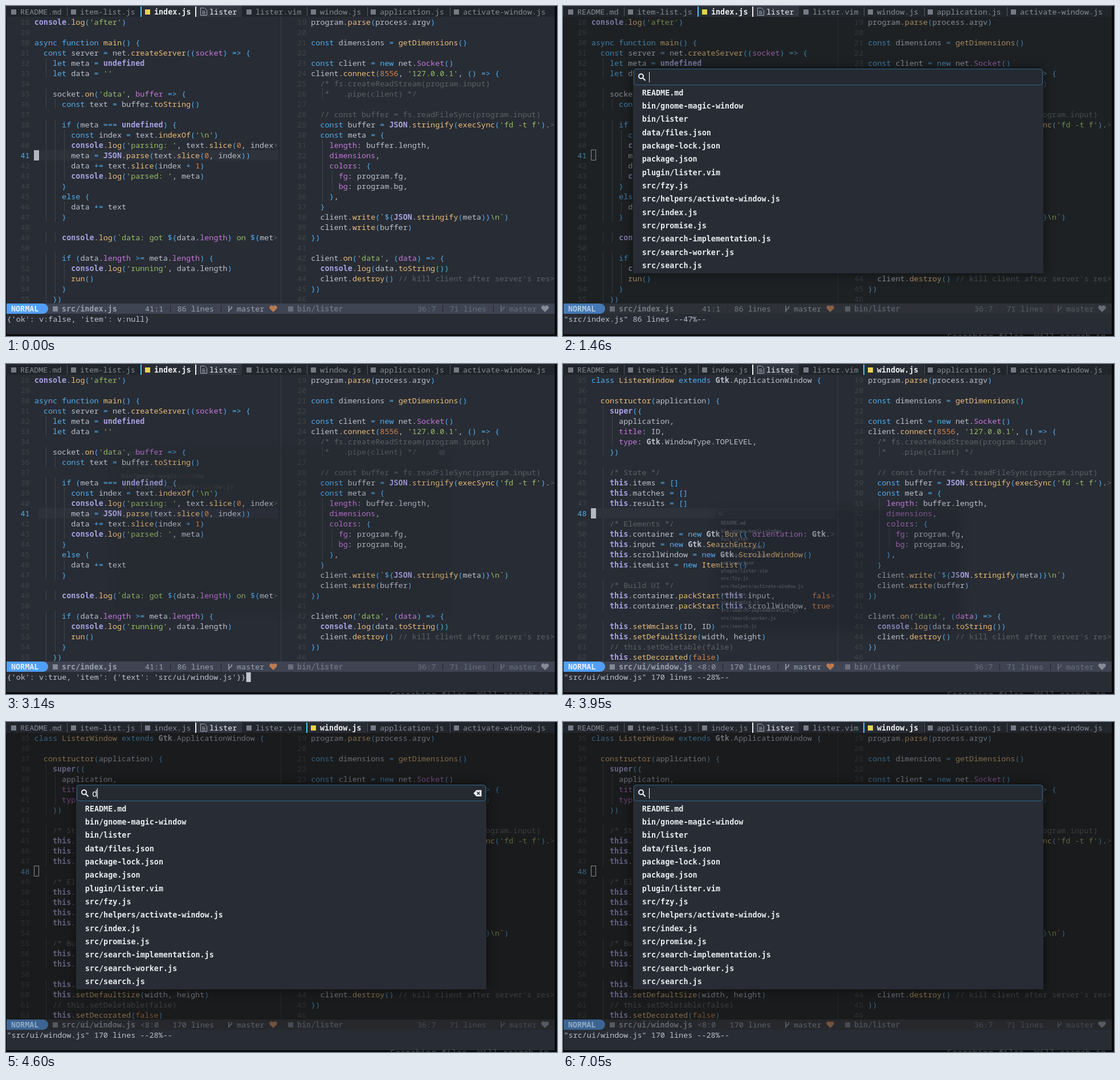
Animation, 967 px wide and 579 px high, one loop 8 s. Source, as an HTML page with a canvas:

```html
<!DOCTYPE html>
<html lang="en">
<head>
<meta charset="utf-8">
<title>Lister demo</title>
<style>
html, body { margin: 0; height: 100%; overflow: hidden; background: #08090b; }
canvas { display: block; }
</style>
</head>
<body>
<canvas id="stage" width="967" height="579"></canvas>
<script>
const ctx = document.getElementById('stage').getContext('2d');
const LOOP = 8000, CELL = 8.07, ROW = 18;
const REGULAR = '13.45px "Noto Sans Mono", monospace';
const BOLD = 'bold 13.4px "DejaVu Sans Mono", monospace';
const INPUT = '15.4px "Noto Sans", sans-serif';
const C = {
  bg: '#282c34', fg: '#bbc2cf', grey: '#3f444a', comment: '#5b6268', blue: '#51afef',
  violet: '#a9a1e1', yellow: '#ecbe7b', green: '#98be65', magenta: '#c678dd',
  orange: '#da8548', tab: '#868c96', white: '#eef0f3', status: '#9aa1ad', faint: '#69707c'
};

const INDEX_JS = String.raw`console.log('after')

async function main() {
  const server = net.createServer((socket) => {
    let meta = undefined
    let data = ''

    socket.on('data', buffer => {
      const text = buffer.toString()

      if (meta === undefined) {
        const index = text.indexOf('\n')
        console.log('parsing: ', text.slice(0, index>
        meta = JSON.parse(text.slice(0, index))
        data += text.slice(index + 1)
        console.log('parsed: ', meta)
      }
      else {
        data += text
      }

      console.log(~data: got #{data.length} on #{met>

      if (data.length >= meta.length) {
        console.log('running', data.length)
        run()
      }
    })`;

const WINDOW_JS = `class ListerWindow extends Gtk.ApplicationWindow {

  constructor(application) {
    super({
      application,
      title: ID,
      type: Gtk.WindowType.TOPLEVEL,
    })

    /* State */
    this.items = []
    this.matches = []
    this.results = []

    /* Elements */
    this.container = new Gtk.Box({ orientation: Gtk.>
    this.input = new Gtk.SearchEntry()
    this.scrollWindow = new Gtk.ScrolledWindow()
    this.itemList = new ItemList()

    /* Build UI */
    this.container.packStart(this.input,        fals>
    this.container.packStart(this.scrollWindow, true>

    this.setWmclass(ID, ID)
    this.setDefaultSize(width, height)
    // this.setDeletable(false)
    this.setDecorated(false)`;

const CLIENT_JS = String.raw`program.parse(process.argv)

const dimensions = getDimensions()

const client = new net.Socket()
client.connect(8556, '127.0.0.1', () => {
  /* fs.createReadStream(program.input)
   *   .pipe(client) */

  // const buffer = fs.readFileSync(program.input)
  const buffer = JSON.stringify(execSync('fd -t f').>
  const meta = {
    length: buffer.length,
    dimensions,
    colors: {
      fg: program.fg,
      bg: program.bg,
    },
  }
  client.write(~#{JSON.stringify(meta)}\n~)
  client.write(buffer)
})

client.on('data', (data) => {
  console.log(data.toString())
  client.destroy() // kill client after server's res>
})
`;

// Each rule: pattern, colour, bold
const RULES = [
  [/\/[\/*].*|^\s*\*.*/, C.comment],
  [/>$/, C.comment],
  [/'[^']*'|`[^$`]*|(?<=\$\{[^}]*\})[^$`>]+`?/, C.green],
  [/\b(?:async|function|const|let|new|if|else|class|extends)\b/, C.blue],
  [/\b(?:console|JSON|undefined|this|super)\b/, C.violet, true],
  [/\bGtk\b/, C.fg, true],
  [/\b(?:false|fals|true|\d+)\b/, C.orange],
  [/\bSocket\b|\blength(?= >|\) \{|\})|\w+(?=:| =>|\) =>)|^\s+dimensions/, C.magenta],
  [/\b(?:title|ListerWindow|\w+(?=\())/, C.yellow],
  [/[-=<>+{}()[\]$]+/, C.blue],
  [/\w+|[^\w\s]/, C.fg]
];
const LEXER = new RegExp(RULES.map(r => `(${r[0].source})`).join('|'), 'g');

const lex = source => source.replace(/~/g, '`').replace(/#\{/g, '${').split('\n').map(line => ({
  indent: line.search(/\S/),
  tokens: [...line.matchAll(LEXER)].map(m => {
    const rule = RULES[m.slice(1).findIndex(g => g !== undefined)];
    return { text: m[0], col: m.index, color: rule[1], bold: rule[2] };
  })
}));
const CODE = { index: lex(INDEX_JS), window: lex(WINDOW_JS), client: lex(CLIENT_JS) };

const FILES = `README.md bin/gnome-magic-window bin/lister data/files.json package-lock.json
package.json plugin/lister.vim src/fzy.js src/helpers/activate-window.js src/index.js
src/promise.js src/search-implementation.js src/search-worker.js src/search.js
src/ui/window.js`.split(/\s+/);
const TYPED = [[0, ''], [1730, 'w'], [1870, 'wi'], [2030, 'win'], [2090, 'wind'], [3950, ''],
  [4600, 'd'], [5180, 'df'], [5720, 'dfj'], [7050, '']];
const FILTER = [[0, ''], [2230, 'wind'], [3950, ''], [4750, 'd'], [5330, 'df'], [5860, 'dfj'], [7050, '']];

const clamp = v => Math.max(0, Math.min(1, v));
const valueAt = (track, t) => track.filter(([start]) => start <= t).pop()[1];

function rect(x, y, w, h, color) {
  ctx.fillStyle = color;
  ctx.fillRect(x, y, w, h);
}
function text(str, x, y, color, font = REGULAR) {
  ctx.font = font;
  ctx.fillStyle = color;
  ctx.fillText(str, x, y);
}
function path(d, color, width) {
  const p = new Path2D(d);
  ctx.strokeStyle = ctx.fillStyle = color;
  ctx.lineWidth = width || 1;
  width ? ctx.stroke(p) : ctx.fill(p);
}

function pane(lines, x, first, current) {
  lines.forEach((line, i) => {
    const y = 32.5 + i * ROW;
    text(first + i, x - 3 * CELL, y, first + i === current ? C.blue : C.grey);
    for (let c = 2; c < line.indent; c += 2) rect(Math.round(x + (c + .5) * CELL), y - 13.5, 1, ROW, C.grey);
    for (const k of line.tokens) text(k.text, x + k.col * CELL, y, k.color, k.bold ? BOLD : REGULAR);
  });
}

function tabs(active) {
  rect(0, 0, 963, 19, '#21252c');
  rect(334, 0, 80, 19, '#30353f');
  [['README.md', 0, 25], ['item-list.js', 107, 130], ['index.js', 237, 260], ['lister', 333, 357],
    ['lister.vim', 414, 438], ['window.js', 528, 551], ['application.js', 634, 656],
    ['activate-window.js', 779, 802]].forEach(([name, left, x]) => {
    const on = name === active, shown = name === 'lister';
    if (on) rect(left, 0, x + name.length * CELL - left + 9, 19, C.bg);
    if (on || shown) rect(left - 1, 1, 2, 18, on ? '#46c9f5' : C.white);
    else if (left && name !== 'lister.vim') rect(left, 2, 1, 16, '#565b65');
    if (shown) path('M341.5 3.5h7l4 4v9h-11zM344 9h5M344 11.5h6M344 14h6', '#a5abb5', 1);
    else rect(x - 16, 6, 9, 9, on ? '#e6d34a' : '#757b85');
    text(name, x, 14.5, on || shown ? C.white : C.tab, on ? BOLD : REGULAR);
  });
}

function branch(x, color) {
  path(`M${x - 2} 526v11M${x + 3} 527v3l-5 4`, color, 1.6);
  text('master', x + 12, 536, color);
}
function heart(x, color) {
  path(`M${x} 537l-6-6a3.4 3.4 0 0 1 6-4a3.4 3.4 0 0 1 6 4z`, color);
}

function statusLine(inWindow) {
  const sep = x => rect(x, 525, 1, 13, '#23272e');
  ctx.beginPath();
  ctx.roundRect(1, 522, 73, 18, [0, 9, 9, 0]);
  ctx.fillStyle = '#519ff8';
  ctx.fill();
  text('NORMAL', 9, 536, '#e8f1fc', BOLD);
  rect(82, 527, 9, 9, '#858b96');
  text(inWindow ? 'src/ui/window.js' : 'src/index.js', 98, 536, C.status, BOLD);
  text(inWindow ? '<8:0' : '41:1', inWindow ? 236 : 244, 536, C.status);
  sep(inWindow ? 280 : 288);
  text(inWindow ? '170 lines' : '86 lines', inWindow ? 292.5 : 300.5, 536, C.status);
  sep(377);
  branch(393, C.status);
  heart(469, '#bd7a4e');
  rect(495, 527, 9, 9, C.faint);
  text('bin/lister', 511, 536, C.faint, BOLD);
  text('36:7', 722, 536, C.faint);
  sep(766);
  text('71 lines', 778.5, 536, C.faint);
  sep(855);
  branch(871, C.faint);
  heart(946, '#858b96');
}

function editor(t, dim, focused) {
  const inWindow = t >= 3190;
  rect(0, 0, 967, 579, '#08090b');
  rect(1, 0, 962, 576, C.bg);
  if (focused) rect(57, 253, 421, ROW, '#2d323b');
  rect(482, 19, 1, 503, '#3a3f47');
  rect(1, 522, 962, 18, '#3f4452');
  rect(1, 19, 962, 521, `rgba(12,10,0,${.47 * dim})`);
  tabs(inWindow ? 'window.js' : 'index.js');

  ctx.globalAlpha = 1 - .5 * dim;
  pane(inWindow ? CODE.window : CODE.index, 49.7, inWindow ? 35 : 28, inWindow ? 48 : 41);
  pane(CODE.client, 535.3, 19);
  statusLine(inWindow);
  ctx.globalAlpha = 1;

  const replying = t >= 3100 && t < 3190;
  if (!focused) path('M49.5 252.5h8v18h-8z', '#8b9097', 1);
  else if (!replying) rect(49, 253, 9, ROW, '#b4b8c0');
  const message = inWindow ? '"src/ui/window.js" 170 lines --28%--'
    : replying ? "{'ok': v:true, 'item': {'text': 'src/ui/window.js'}}"
    : t >= 1120 ? '"src/index.js" 86 lines --47%--'
    : "{'ok': v:false, 'item': v:null}";
  text(message, 1.5, 554, C.fg);
  if (replying) rect(2 + message.length * CELL, 541, 8, 17, '#c2c6ce');
  if (t >= 50) text('Searching files, Will search in', 674, 585, '#4a4e55', '15px "Noto Sans Mono", monospace');
}

// Substring hits win; otherwise the letters are matched in order.
function matchColumns(name, query) {
  const at = name.lastIndexOf(query);
  let from = -1;
  return [...query].map((ch, i) => at >= 0 ? at + i : (from = name.indexOf(ch, from + 1)));
}
function search(query) {
  if (!query) return FILES.slice(0, 14);
  const rank = name => name[0] === query[0] ? 0 : name.length;
  return FILES.filter(name => !matchColumns(name, query).includes(-1)).sort((a, b) => rank(a) - rank(b));
}

function popup(t, alpha, scale, pivotY, focused) {
  const query = valueAt(TYPED, t), filter = valueAt(FILTER, t);
  ctx.save();
  ctx.globalAlpha = alpha;
  ctx.translate(483, pivotY);
  ctx.scale(scale, scale);
  ctx.translate(-483, -pivotY);

  ctx.shadowColor = 'rgba(0,0,0,.55)';
  ctx.shadowBlur = 18;
  ctx.beginPath();
  ctx.roundRect(123, 110, 720, 359, [5, 5, 0, 0]);
  ctx.fillStyle = C.bg;
  ctx.fill();
  ctx.shadowColor = 'transparent';

  ctx.beginPath();
  ctx.roundRect(124.5, 110.5, 717, 28, 4);
  ctx.fillStyle = '#252a32';
  ctx.fill();
  ctx.strokeStyle = '#30658a';
  ctx.lineWidth = 1;
  ctx.stroke();
  path('M141 123.3a4 4 0 1 0-8 0a4 4 0 1 0 8 0M140 126.3l4.5 4.5', focused ? C.white : '#858b95', 2);
  text(query, 151, 131, C.white, INPUT);
  if (focused) rect(Math.round(151 + ctx.measureText(query).width), 116, 1, 18, C.white);
  if (query) {
    path('M820.5 125l5-5.5h9v11h-9z', C.white);
    path('M826.5 122.5l5 5m0-5l-5 5', '#252a32', 1.6);
  }
  search(filter).forEach((name, i) => {
    const hits = matchColumns(name, filter), y = 156.5 + i * 23.35;
    [...name].forEach((ch, c) =>
      text(ch, 138.8 + c * CELL, y, hits.includes(c) ? '#b5714a' : '#e9ecf0', BOLD));
  });
  ctx.restore();
}

function draw(now) {
  const t = now % LOOP;
  const closing = t >= 3100 && t < 3190;
  const open = t >= 1120 && t < 3100 || t >= 3950;
  const age = t - (t >= 3950 ? 3950 : 1120);
  const focused = !open || age < 200;
  editor(t, open ? clamp(age / 500) : 0, focused);
  if (open) {
    const ease = 1 - (1 - clamp((age + 30) / 300)) ** 2;
    popup(t, ease, .5 + .5 * ease, 468, !focused);
  } else if (closing) {
    const gone = clamp((t - 3095) / 50);
    popup(t, 1 - gone, 1 - .2 * gone, 290, false);
  }
  requestAnimationFrame(() => draw(performance.now() - start));
}
const start = performance.now();
draw(0);
</script>
</body>
</html>
```
